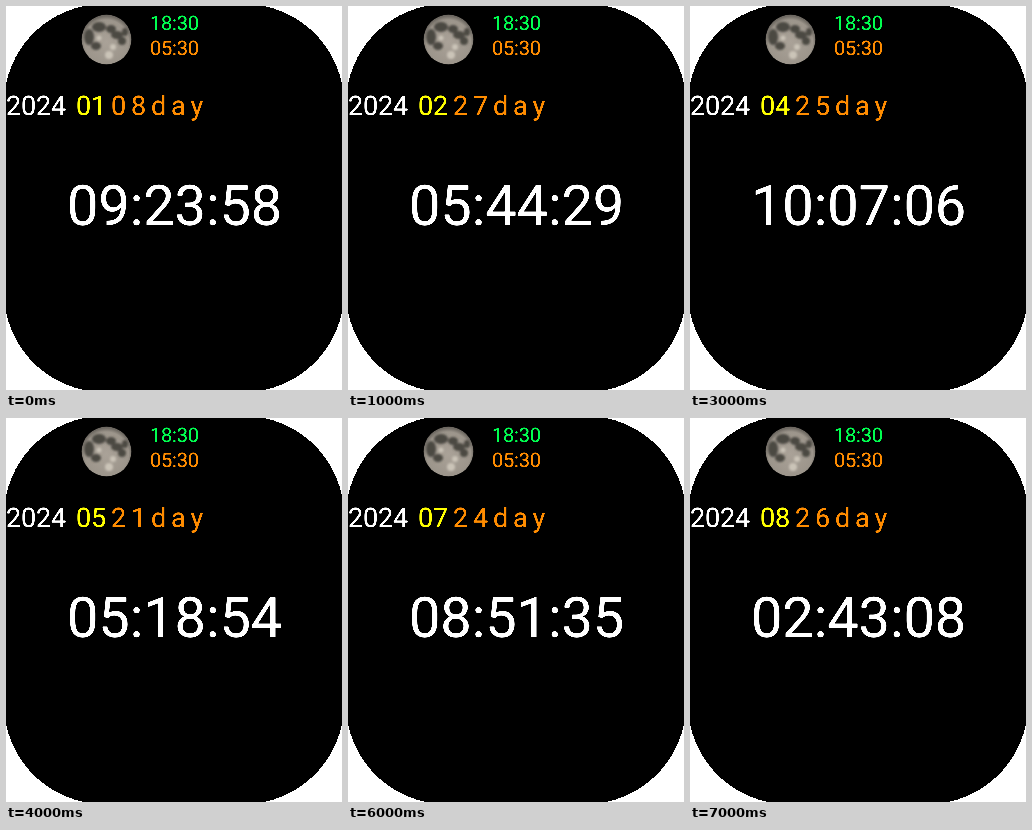
Recreate the animation shown at these times as an HTML page. Size 336 by 384 pixels, loop 8 s.

```html
<!DOCTYPE html>
<html lang="en">
<head>
<meta charset="utf-8">
<title>Watch face</title>
<style>
  html, body { margin: 0; width: 100%; height: 100%; overflow: hidden; background: #fff; }
  svg { display: block; font-family: Roboto, sans-serif; text-rendering: geometricPrecision; }
  .small { font-size: 20px; letter-spacing: -.2px; }
  .date { font-size: 27px; letter-spacing: -.16px; }
  #day { letter-spacing: 4.84px; }
  #time { font-size: 56px; letter-spacing: -.1px; }
</style>
</head>
<body>
<svg width="336" height="384" viewBox="0 0 336 384">
  <defs>
    <radialGradient id="surface" cx=".5" cy=".55" r=".52">
      <stop offset="0" stop-color="#aaa298"/>
      <stop offset=".85" stop-color="#9c958b"/>
      <stop offset="1" stop-color="#6d6861"/>
    </radialGradient>
    <clipPath id="disc"><circle cx="100.5" cy="33.5" r="25"/></clipPath>
    <filter id="soft"><feGaussianBlur stdDeviation="1.2"/></filter>
    <filter id="crisp" color-interpolation-filters="sRGB">
      <feComponentTransfer><feFuncA type="linear" slope="3" intercept="-.75"/></feComponentTransfer>
    </filter>
  </defs>
  <!-- The rounded screen reaches slightly past the stage. -->
  <rect x="-2" y="-2" width="340" height="388" rx="100" shape-rendering="crispEdges"/>

  <g clip-path="url(#disc)">
    <circle cx="100.5" cy="33.5" r="25" fill="url(#surface)"/>
    <g fill="#4b4843" filter="url(#soft)">
      <ellipse cx="93" cy="21" rx="7" ry="5"/>
      <ellipse cx="83" cy="31" rx="5" ry="8"/>
      <ellipse cx="105" cy="23" rx="5" ry="4"/>
      <ellipse cx="111" cy="29" rx="6" ry="4"/>
      <ellipse cx="119" cy="26" rx="3" ry="4"/>
      <ellipse cx="90" cy="40" rx="5" ry="4"/>
      <ellipse cx="116" cy="35" rx="4" ry="4"/>
    </g>
    <g fill="#cbc4b8" filter="url(#soft)">
      <circle cx="93" cy="32" r="2.5"/>
      <circle cx="103" cy="49" r="4"/>
      <circle cx="107" cy="41" r="3"/>
    </g>
  </g>

  <g filter="url(#crisp)">
    <text class="small" x="144" y="24" fill="#00ff50">18:30</text>
    <text class="small" x="144" y="49" fill="#ff8c00">05:30</text>
    <text class="date" x="0" y="109" fill="#fff">2024</text>
    <text class="date" id="month" x="70" y="109" fill="#ff0"></text>
    <text class="date" id="day" x="105" y="109" fill="#ff8c00"></text>
    <text id="time" x="61" y="219" fill="#fff"></text>
  </g>
</svg>
<script>
const readings = [
  ["08", "09:23:58"], ["27", "05:44:29"], ["20", "14:00:47"], ["25", "10:07:06"],
  ["21", "05:18:54"], ["22", "17:32:23"], ["24", "08:51:35"], ["26", "02:43:08"],
];
const [month, day, time] = ["month", "day", "time"].map(id => document.getElementById(id));
let shown = -1;

function draw() {
  const index = Math.floor(performance.now() / 1000) % readings.length;
  if (index !== shown) {
    shown = index;
    month.textContent = "0" + (index + 1);
    day.textContent = readings[index][0] + "day";
    time.textContent = readings[index][1];
  }
  requestAnimationFrame(draw);
}
draw();
</script>
</body>
</html>
```
